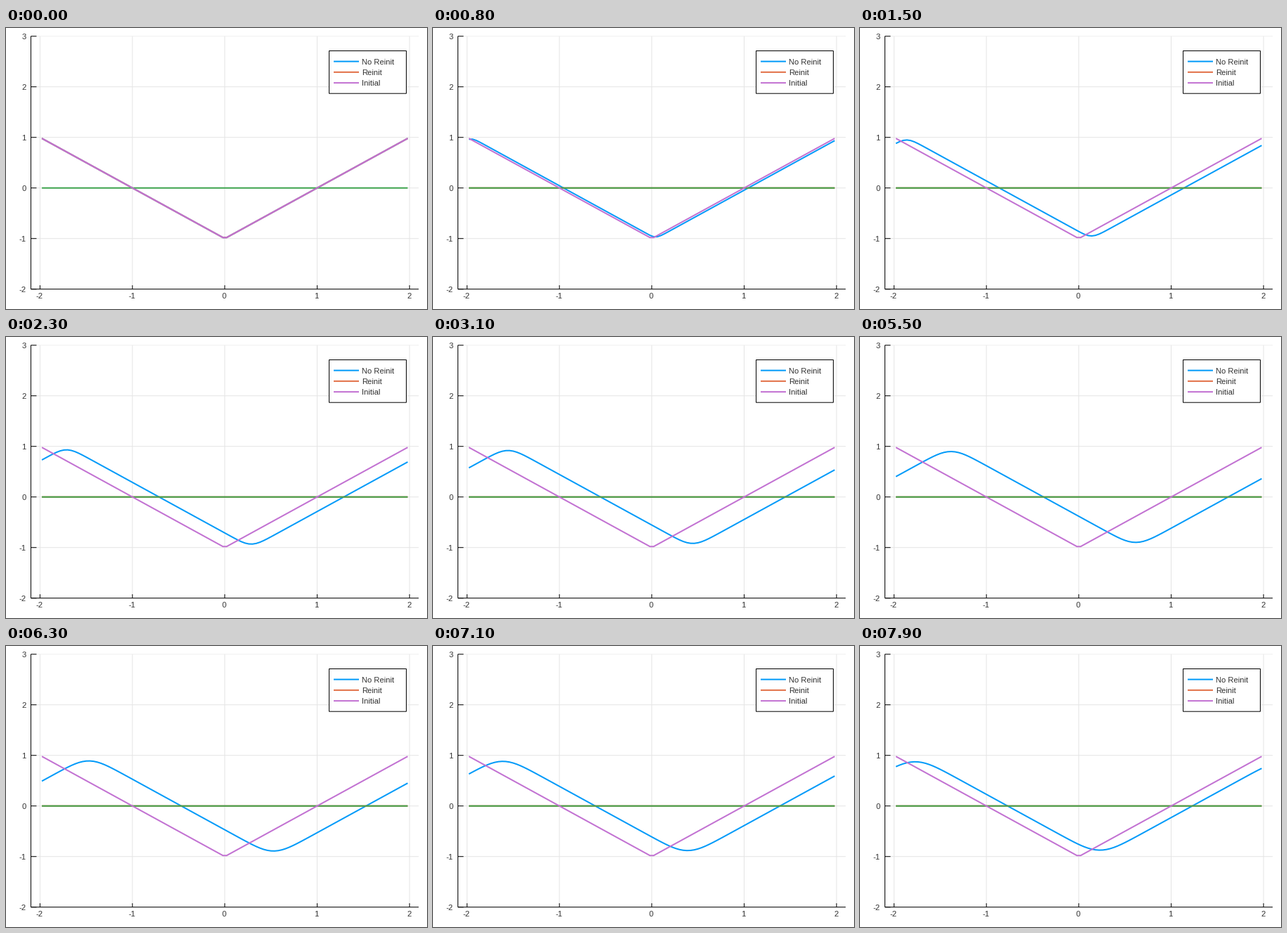
A matplotlib script for the animation above (8 s loop, 600 by 400 pixels).

```python
import numpy as np
import matplotlib.pyplot as plt
from matplotlib.animation import FuncAnimation
from matplotlib.patches import Rectangle

W, H = 600, 400
FRAMES, INTERVAL = 80, 100
DX, DT = 0.04, 0.02
BLUE, ORANGE, GREEN, PURPLE = "#009af9", "#e26f46", "#3da44d", "#c271d2"
PT = 0.72  # points per pixel at 100 dpi

x = -1.98 + DX * np.arange(100)
initial = np.abs(x) - 1


def px(v):
    return 311.8 + 131.65 * np.asarray(v)


def py(v):
    return 227.7 - 72 * np.asarray(v)


def advect():
    """Periodic first-order upwind transport with velocity sin(pi t)."""
    phi = initial.copy()
    states = [phi]
    for k in range(1, FRAMES):
        c = np.sin(np.pi * k * DT) * DT / DX
        if c > 0:
            phi = phi - c * (phi - np.roll(phi, 1))
        else:
            phi = phi - c * (np.roll(phi, -1) - phi)
        states.append(phi)
    return states


states = advect()


def reinit(k):
    """The reinitialised profile overshoots once, then collapses to zero."""
    if k == 0:
        return initial
    return 1.93 * states[1] if k == 1 else np.zeros_like(x)


fig = plt.figure(figsize=(W / 100, H / 100), dpi=100, facecolor="white")
ax = fig.add_axes([0, 0, 1, 1])
ax.set_xlim(0, W)
ax.set_ylim(H, 0)
ax.axis("off")


def line(xs, ys, color, width=1, z=1):
    return ax.plot(xs, ys, color=color, lw=width * PT, zorder=z, snap=False,
                   solid_capstyle="butt", solid_joinstyle="round")[0]


def label(tx, ty, s, ha):
    ax.text(tx, ty, s, ha=ha, va="center_baseline", color="#333333",
            family="Liberation Sans", fontsize=11.2 * PT, zorder=11)


LEFT, RIGHT = px(-2.0988), px(2.0988)
TOP, BOTTOM = py(3), py(-2)

for v in range(-2, 3):
    line([px(v)] * 2, [TOP, BOTTOM], "#e5e5e5")
    line([px(v)] * 2, [BOTTOM, BOTTOM - 5.5], "black", z=2)
    label(px(v) - 1, 380.6, str(v), "center")
for v in range(-2, 4):
    line([LEFT, RIGHT], [py(v)] * 2, "#e5e5e5" if v < 3 else "#f0f0f0")
    line([LEFT, LEFT + 8], [py(v)] * 2, "black", z=2)
    label(28.5, py(v), str(v), "right")
line([LEFT, LEFT], [TOP, BOTTOM], "black", z=2)
line([LEFT, RIGHT], [BOTTOM, BOTTOM], "black", z=2)

plain = line(px(x), py(initial), BLUE, 2, 3)
fixed = line(px(x), py(initial), ORANGE, 2, 4)
line(px(x), py(0 * x), GREEN, 2, 5)
line(px(x), py(initial), PURPLE, 2, 6)

ax.add_patch(Rectangle((460.5, 32.5), 110, 60.7, fc="white", ec="black",
                       lw=PT, zorder=10, snap=False))
for i, (name, color) in enumerate([("No Reinit", BLUE), ("Reinit", ORANGE),
                                   ("Initial", PURPLE)]):
    y = 47.6 + 15.25 * i
    line([467, 503], [y, y], color, 2, 11)
    label(507, y + 0.3, name, "left")


def update(k):
    plain.set_ydata(py(states[k]))
    fixed.set_ydata(py(reinit(k)))
    return plain, fixed


anim = FuncAnimation(fig, update, frames=FRAMES, interval=INTERVAL,
                     repeat=True, repeat_delay=0)
plt.show()
```
